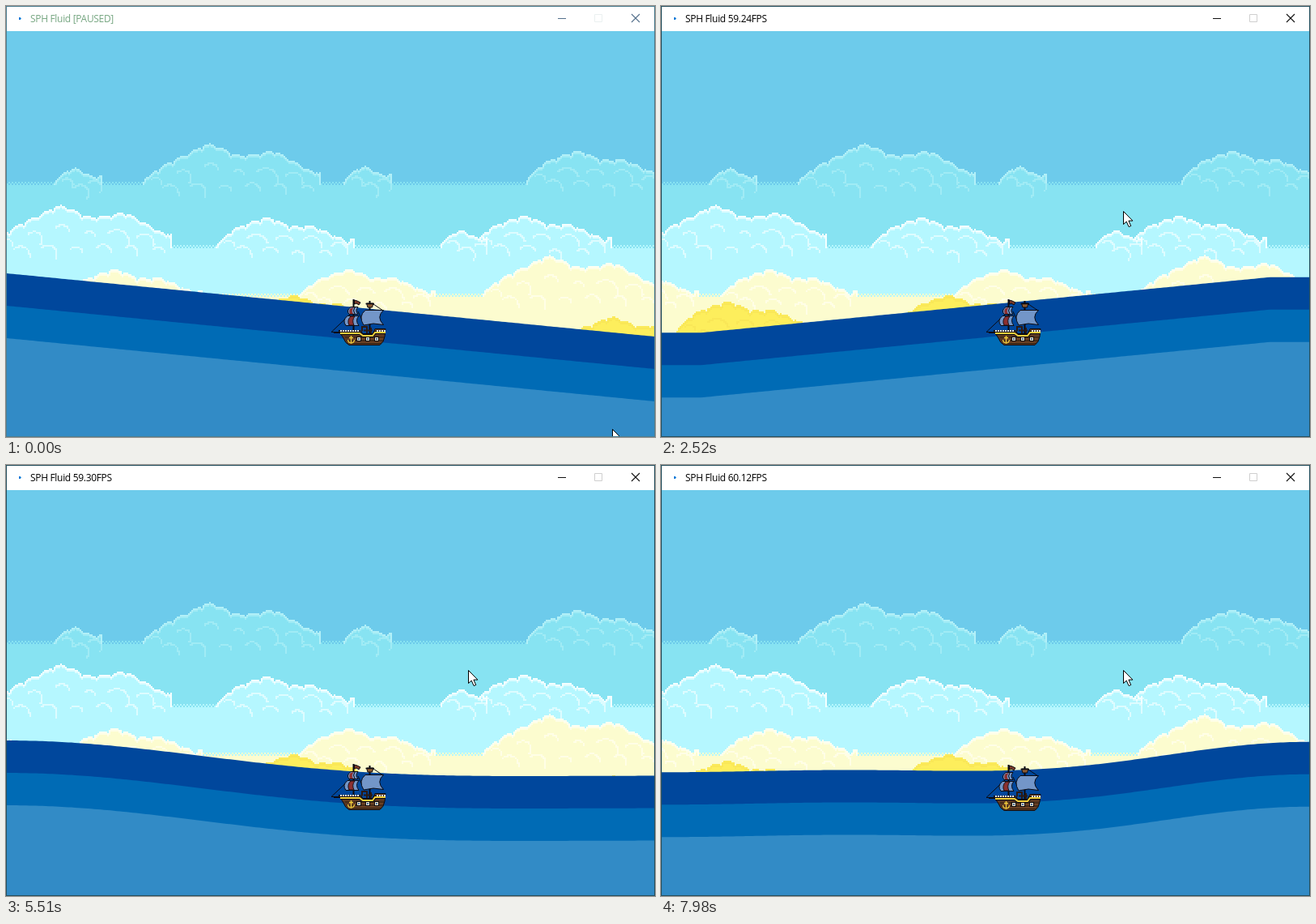
These frames come from a looping animation (802 px wide and 532 px high, 8000 ms). An HTML page with a canvas:

```html
<!DOCTYPE html>
<html lang="en">
<head>
<meta charset="utf-8">
<title>SPH Fluid</title>
<style>
html, body { margin: 0; width: 100%; height: 100%; overflow: hidden; background: #fff; }
canvas { display: block; }
</style>
</head>
<body>
<canvas id="stage" width="802" height="532"></canvas>
<script>
const W = 802, H = 532, LOOP = 8000;
const START = 400, STEP = 66.4;
const ctx = document.getElementById('stage').getContext('2d');
const clamp = (v, a, b) => Math.min(b, Math.max(a, v));
const mix = (a, b, u) => a + (b - a) * u;
const smooth = (a, b, t) => { const u = clamp((t - a) / (b - a), 0, 1); return u * u * (3 - 2 * u); };

function seeded(seed) {
  return () => {
    seed = (seed * 16807) % 2147483647;
    return seed / 2147483647;
  };
}

// ---------- sky, painted in 2px blocks ----------

// each cloud is a ridge through a few points; scallops and folds follow by rule
const small = [[60, 218], [82, 199], [118, 217]];
const large = [[170, 217], [190, 200], [252, 170], [288, 187], [332, 180], [388, 211]];
const medium = [[260, 296], [278, 278], [322, 261], [357, 275], [376, 271], [430, 295]];

const tiers = [
  { base: 218, fill: '#87e3f2', edge: '#b2f0f8', fold: '#a0ebf5',
    clouds: [[small, 0, 0], [large, 0, 0], [small, 358, -2], [medium, 384, -82]] },
  { base: 296, fill: '#b5f7ff', edge: '#f4ffff', fold: '#ddfcff',
    clouds: [[large, -184, 76], [medium, 0, 0], [medium, 318, -2], [small, 477, 77]] },
  { base: 357, fill: '#fcfccf', edge: '#fffff2', fold: '#fffee6',
    clouds: [[medium, -383, 64], [medium, -188, 64], [medium, 101, 64], [large, 420, 138]] },
  { base: 410, hidden: true, fill: '#fdee5c', edge: '#fbea5a', fold: '#f9e757',
    clouds: [[medium, -240, 104], [medium, 33, 96], [medium, 428, 123]] }
];

function ridgeAt(points, x) {
  const i = clamp(points.findIndex(p => p[0] >= x), 1, points.length - 1);
  const [x0, y0] = points[i - 1], [x1, y1] = points[i];
  return mix(y0, y1, clamp((x - x0) / (x1 - x0), 0, 1));
}

function cloudTop(points, x) {
  const left = points[0][0], right = points[points.length - 1][0];
  if (x < left || x > right) return Infinity;
  const ridge = (ridgeAt(points, x - 6) + ridgeAt(points, x) + ridgeAt(points, x + 6)) / 3;
  const scallop = Math.sqrt(Math.abs(Math.sin(Math.PI * (x - left) / 18)));
  return ridge + 2 - 4 * scallop;
}

function makeSky() {
  const sky = document.createElement('canvas');
  sky.width = 400;
  sky.height = 250;
  const g = sky.getContext('2d');
  const row = y => Math.round((y - 31) / 2);
  const put = (x, y, w, h, color) => { g.fillStyle = color; g.fillRect(x, y, w, h); };

  function drawFolds(points, dx, dy, color) {
    const left = points[0][0], right = points[points.length - 1][0], base = points[0][1];
    const random = seeded(left);
    for (let x = left + 14, i = 0; x < right - 6; x += 17, i++) {
      const r = 8 + 7 * random();
      const cy = i % 2 ? base + 10 + 4 * random() : mix(ridgeAt(points, x), base, 0.5) + r;
      const end = 330 + 70 * random();
      for (let a = 225; a <= end; a += 3) {
        const px = x + dx + r * Math.cos(a * Math.PI / 180);
        const py = cy + dy + r * Math.sin(a * Math.PI / 180);
        put(Math.round((px - 1) / 2), row(py), 1, 1, color);
      }
    }
  }

  function drawCloud([points, dx, dy], tier) {
    const base = row(tier.base) + 1;
    const top = x => Math.min(base, row(cloudTop(points, 2 * x + 2 - dx) + dy));
    for (let x = 0; x < 400; x++) {
      const y = top(x);
      if (y >= base) continue;
      const edge = Math.max(y + 1, top(x - 1), top(x + 1));
      put(x, y, 1, base - y, tier.fill);
      put(x, y, 1, Math.min(edge + 1, base) - y, tier.fold);
      put(x, y, 1, Math.min(edge, base) - y, tier.edge);
    }
    drawFolds(points, dx, dy, tier.fold);
  }

  put(0, 0, 400, 250, '#6dcbeb');
  for (const tier of tiers) {
    const base = row(tier.base);
    if (!tier.hidden) {
      put(0, base + 1, 400, 250, tier.fill);
      for (let x = 0; x < 400; x++) put(x, base - x % 2, 1, 1, tier.fill);
    }
    for (const cloud of tier.clouds) drawCloud(cloud, tier);
  }
  return sky;
}
const sky = makeSky();

// ---------- water ----------

const PERIOD = 4530, REST = 369;

// a straight tilt that softens into a cosine, repeating every 2 units
function swell(u, soft) {
  const d = Math.abs(u - 2 * Math.round(u / 2));
  return mix(39 * (1 - 2 * d), 31 * Math.cos(Math.PI * u), soft);
}

// two opposite travelling swells, plus overtones that build up later
function surface(t) {
  const shift = 2 * (t - START) / PERIOD;
  const soft = smooth(4000, 5500, t);
  const second = 8.5 * smooth(3700, 5400, t) * Math.cos(4 * Math.PI * (t - 6850) / PERIOD);
  const third = 4 * smooth(5000, 7200, t) * Math.cos(6 * Math.PI * (t - 7980) / PERIOD);
  return x => {
    const u = x / 800;
    return REST - (swell(u - shift, soft) + swell(u + shift, soft)) / 2
      + second * Math.cos(2 * Math.PI * u) + third * Math.cos(3 * Math.PI * u);
  };
}

function drawWater(level) {
  ['#00479c', '#006bb5', '#328bc6'].forEach((color, i) => {
    ctx.fillStyle = color;
    ctx.beginPath();
    ctx.moveTo(1, 531);
    for (let x = 0; x <= 800; x += 4) ctx.lineTo(x + 1, level(x) + 40 * i);
    ctx.lineTo(801, 531);
    ctx.fill();
  });
}

// ---------- ship ----------

function shape(d, fill, line = '#0b0b12', width = 1) {
  const path = new Path2D(d);
  if (fill) { ctx.fillStyle = fill; ctx.fill(path); }
  if (line) { ctx.strokeStyle = line; ctx.lineWidth = width; ctx.stroke(path); }
}

function box(x, y, w, h, color) {
  ctx.fillStyle = color;
  ctx.fillRect(x, y, w, h);
}

function drawShip(y) {
  const sail = '#7396c8', red = '#8c3030', wood = '#5b3822', gold = '#f4cf3c';
  ctx.save();
  ctx.translate(402, Math.round(y));
  // rigging and masts
  shape('M0 40.5 L27 15 M52 6 L64 14 M33 15 L40 30', null);
  shape('M27.5 0 V40 M47.5 2 V42', null, '#0b0b12', 2);
  shape('M0 40.5 H22 M3 41.5 H14', null);
  shape('M28.5 1 L32 2 L36 4 L34 7 L31 5 L28.5 6 Z', '#7c3a28');
  shape('M43.5 5 H52 L50.5 10 H45 Z', '#8a5a30');
  shape('M42.5 5.5 H53', null, '#0b0b12', 1.5);
  // fore sails
  shape('M24 9.5 H33 Q29 14 33 18.5 H22 Q18 14 24 9.5 Z', sail);
  shape('M24 11 Q21 14 23 18 H27 Q24 14 28 10 Z', red, null);
  shape('M29 10 Q26 14 29 18', null);
  shape('M20 20.5 H34 Q29 26 34 32.5 H18 Q13 26 20 20.5 Z', sail);
  shape('M24 21 H29 Q25 26 28 32 H22 Q19 26 24 21 Z', red, '#1a1018');
  // main sail
  shape('M42 13.5 H64.5 Q55 22 64.5 31.5 L52 30 L40 32 Q33 21 42 13.5 Z', sail);
  // hull
  shape('M9 38.5 H36 L39 42.5 H51 L54 36.5 H67 L66 46 Q65 53 60 56.5 H22 Q17 54 15 48 Z', wood);
  shape('M17 47 H65 M19 51 H64 M22 54.5 H61', null, '#33200f');
  shape('M21 49 H64 M23 53 H61', null, '#7a4a28');
  const trim = 'M11 42 H35 L39 45 H51 L54 41 H67';
  shape(trim, null, '#0b0b12', 4);
  shape(trim, null, gold, 2);
  for (let x = 11; x < 66; x += 3) {
    if (x < 35 || x > 53) box(x, 38, 2, 2, '#dfe4ea');
  }
  shape('M38 39.5 V34 H44 V42 M49 35 V42 M40 38.5 H51', null, '#2b1a14', 2);
  for (let x = 34; x < 60; x += 11) {
    box(x - 3, 46, 6, 6, '#0b0b12');
    box(x - 2, 47, 4, 4, '#e8e0c4');
    box(x - 1, 48, 2, 2, '#4a6fa5');
  }
  shape('M24.5 45 V54 M22 47.5 H27 M20.5 50 Q21 54 24.5 54 Q28 54 28.5 50', null, gold, 1.3);
  ctx.restore();
}

// ---------- window and pointer ----------

const rates = ['57.42', '58.26', '59.24', '59.80', '59.71', '59.30', '59.44', '59.59', '60.12'];

function drawFrame(text, active) {
  box(1, 1, 800, 30, '#fff');
  box(16, 14, 2, 3, '#0078d7');
  box(18, 15, 1, 1, '#5aa6e6');
  ctx.font = '12px "Open Sans", "Noto Sans", sans-serif';
  ctx.letterSpacing = '-0.32px';
  ctx.fillStyle = active ? '#000' : '#76a681';
  ctx.fillText(text, 30, 20);
  const icon = active ? '#111' : '#54708c';
  shape('M682 15.5 H692', null, icon);
  shape('M727.5 10.5 H736.5 V19.5 H727.5 Z', null, active ? '#cfcfcf' : '#eaf0f0');
  shape('M773 10 L783 20 M783 10 L773 20', null, icon, 1.1);
  ctx.strokeStyle = active ? '#24505f' : '#4a7e90';
  ctx.lineWidth = 1;
  ctx.strokeRect(0.5, 0.5, W - 1, H - 1);
}

function drawPointer(x, y) {
  ctx.save();
  ctx.translate(x + 0.5, y + 1.5);
  shape('M0 0 V16 L3.7 12.6 L6.6 19 L9.2 18 L6.4 11.6 H11.4 Z', '#fff', '#000');
  ctx.restore();
}

function render(t) {
  const step = Math.floor((t - START + 8) / STEP);
  const running = step >= 0;
  const level = surface(running ? START + step * STEP : START);

  ctx.imageSmoothingEnabled = false;
  ctx.drawImage(sky, 1, 31, 800, 500);
  drawWater(level);
  drawShip(level(401) - 7);

  const moved = clamp(Math.floor((t - 5) / 63), 0, 4) / 4;
  drawPointer(Math.round(mix(749, 571, moved)), Math.round(mix(521, 252, moved)));

  const rate = rates[clamp(Math.floor(step / 13), 0, rates.length - 1)];
  drawFrame(running ? `SPH Fluid ${rate}FPS` : 'SPH Fluid [PAUSED]', moved === 1);
}

const begin = performance.now();
function tick() {
  render((performance.now() - begin) % LOOP);
  requestAnimationFrame(tick);
}
tick();
</script>
</body>
</html>
```
